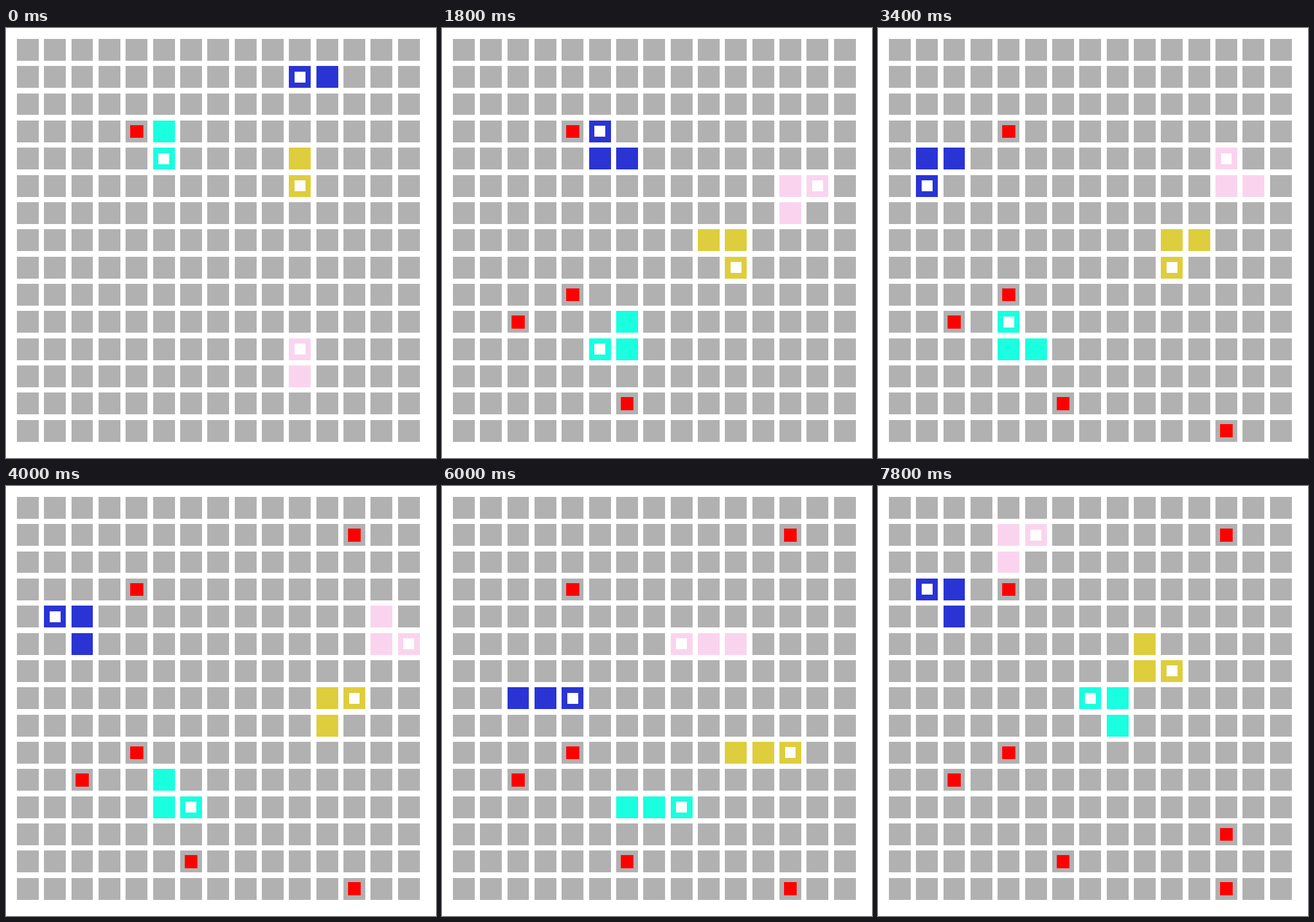
These frames come from a looping animation (748 px wide and 748 px high, 8000 ms). An HTML page with a canvas:

```html
<!DOCTYPE html>
<html lang="en">
<head>
<meta charset="utf-8">
<title>Grid snakes</title>
<style>
  html, body { margin: 0; width: 100%; height: 100%; overflow: hidden; background: #fff; }
  canvas { display: block; width: 748px; height: 748px; }
</style>
</head>
<body>
<canvas id="board" width="748" height="748"></canvas>
<script>
const ctx = document.getElementById('board').getContext('2d');
const CELLS = 15, STEP_MS = 200, STEPS = 40, LENGTH = 3;
const SCALE = 748 / 790; // board is laid out in 790 units
const DIRS = { U: [0, -1], D: [0, 1], L: [-1, 0], R: [1, 0] };

// Each route starts at the tail; its first move leads to the opening head cell.
const snakes = [
  { color: '#2a34d4', start: [11, 1],
    moves: 'L DDLLL LDLULDLUL DLDRUL DRDLUR DDRRRUL ULULUL' },
  { color: '#19ffe0', start: [5, 3],
    moves: 'D DDDDD DRDLURDDL ULURDR URULDL DRRRRUL URULUL' },
  { color: '#decd3c', start: [10, 4],
    moves: 'D LLDDD RURDRURDL ULDRUR DLDLUL DRRRUUL ULULDR' },
  { color: '#fad4ee', start: [10, 12],
    moves: 'U RUUUU URURURDDL ULURDR ULDLUL DLLLLUL ULULUR' }
];

// column, row, step of appearance
const food = [
  [4, 3, 0], [4, 9, 2], [6, 13, 4], [2, 10, 9],
  [12, 14, 16], [12, 1, 19], [12, 12, 35]
];

function trace({ start, moves }) {
  const path = [start, start]; // the tail begins doubled up
  let [x, y] = start;
  for (const move of moves.replace(/ /g, '')) {
    x += DIRS[move][0];
    y += DIRS[move][1];
    path.push([x, y]);
  }
  return path;
}
for (const snake of snakes) snake.path = trace(snake);

function square(col, row, size, color) {
  const edge = (cell, side) => Math.round((40 + cell * 50 + side * size / 2) * SCALE);
  const x = edge(col, -1), y = edge(row, -1);
  ctx.fillStyle = color;
  ctx.fillRect(x, y, edge(col, 1) - x, edge(row, 1) - y);
}

function draw(step) {
  ctx.fillStyle = '#fff';
  ctx.fillRect(0, 0, 748, 748);
  for (let row = 0; row < CELLS; row++)
    for (let col = 0; col < CELLS; col++) square(col, row, 40, '#b1b1b1');

  for (const [col, row, since] of food)
    if (step >= since) square(col, row, 24, '#f00');

  for (const { path, color } of snakes) {
    const body = path.slice(step, step + LENGTH);
    for (const [col, row] of body) square(col, row, 40, color);
    square(...body[LENGTH - 1], 20, '#fff');
  }
}

let shown = -1;
function tick() {
  const step = Math.floor(performance.now() / STEP_MS) % STEPS;
  if (step !== shown) draw(shown = step);
  requestAnimationFrame(tick);
}
tick();
</script>
</body>
</html>
```
